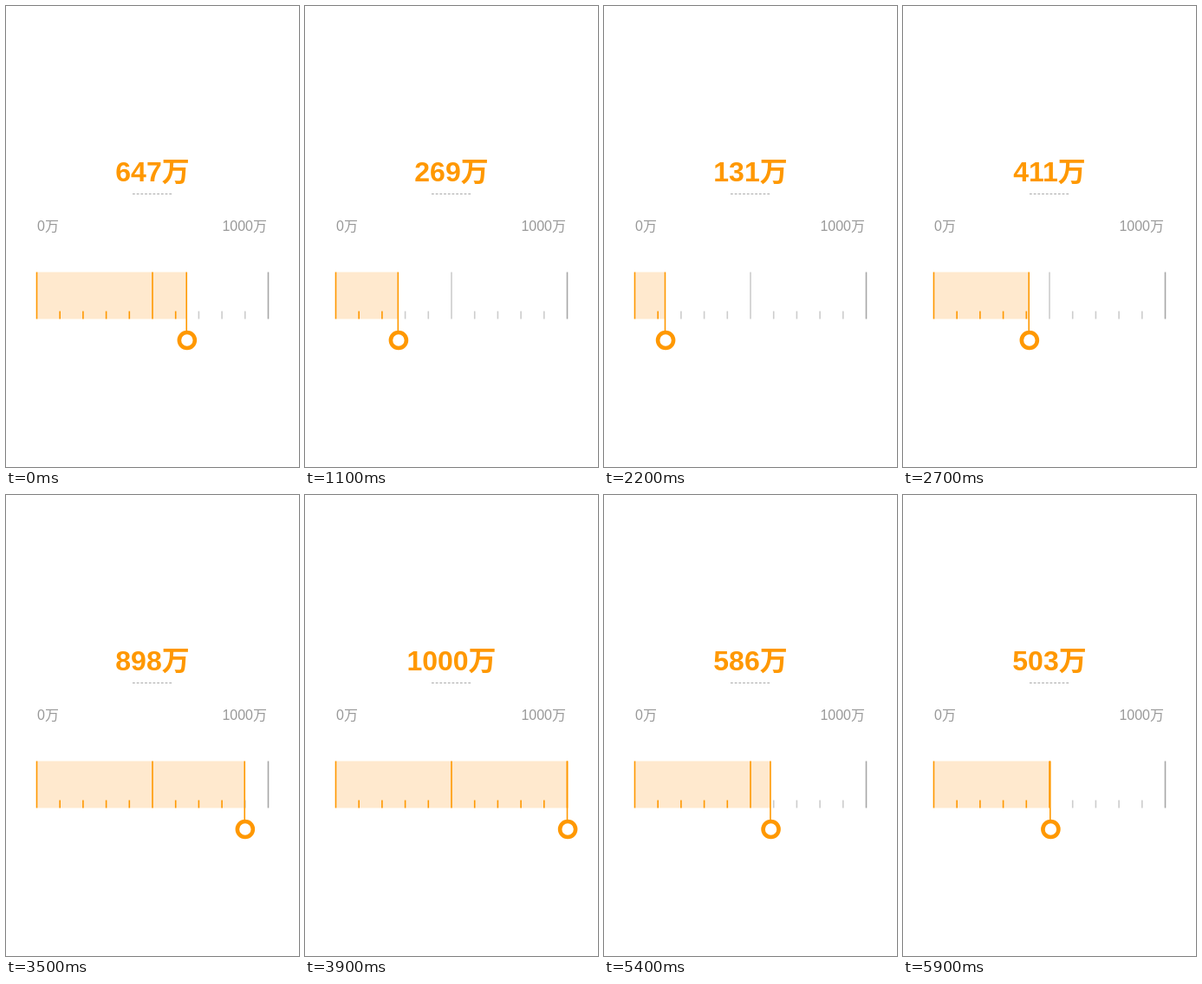
Write an HTML page with a canvas that moves like this. It is 338 px wide and 531 px high and loops after 6 s.

```html
<!DOCTYPE html>
<html lang="zh">
<head>
<meta charset="utf-8">
<style>
  html, body { margin: 0; width: 100%; height: 100%; overflow: hidden; background: #fff; }
  canvas { display: block; }
</style>
</head>
<body>
<canvas id="stage" width="338" height="531"></canvas>
<script>
const ctx = document.getElementById('stage').getContext('2d');
const ORANGE = '#ff9800', FONT = '"Liberation Sans", "Noto Sans CJK SC", "Noto Sans CJK", sans-serif';
const LOOP = 6000, STEP = 100;
const LEFT = 35.5, TOP = 306.5, BOTTOM = 360.5, SCALE = 0.267;

// [time in ms, slider value]
const keys = [
  [0, 647], [500, 647], [600, 650], [800, 534], [1100, 269], [1200, 224], [1700, 90],
  [2100, 90], [2200, 131], [2700, 411], [3500, 898], [3900, 1000],
  [4800, 1000], [4900, 904], [5500, 555], [5900, 503], [LOOP, 503]
];

const slope = i => (keys[i + 1][1] - keys[i][1]) / (keys[i + 1][0] - keys[i][0]);

// Tangent that keeps the curve from overshooting
function tangent(i) {
  if (i === 0 || i === keys.length - 1) return 0;
  const a = slope(i - 1), b = slope(i);
  return a * b > 0 ? 2 * a * b / (a + b) : 0;
}

function valueAt(t) {
  const i = keys.findIndex((k, n) => n < keys.length - 1 && t < keys[n + 1][0]);
  const [t0, v0] = keys[i], [t1, v1] = keys[i + 1];
  const h = t1 - t0, u = (t - t0) / h, w = 1 - u;
  return Math.round(
    w * w * (1 + 2 * u) * v0 + u * u * (3 - 2 * u) * v1 +
    h * u * w * (w * tangent(i) - u * tangent(i + 1)));
}

const xOf = value => LEFT + value * SCALE;

function line(x1, y1, x2, y2, color, width = 1.6) {
  ctx.strokeStyle = color;
  ctx.lineWidth = width;
  ctx.beginPath();
  ctx.moveTo(x1, y1);
  ctx.lineTo(x2, y2);
  ctx.stroke();
}

function label(text, x, y, align, font, color) {
  ctx.font = `${font} ${FONT}`;
  ctx.textAlign = align;
  ctx.fillStyle = color;
  ctx.fillText(text, x, y);
}

function draw(value) {
  const x = xOf(value);
  ctx.fillStyle = '#fff';
  ctx.fillRect(0, 0, 338, 531);

  label(`${value}万`, 169, 201.5, 'center', 'bold 32px', ORANGE);
  label('0万', 36, 259, 'left', '16px', '#999');
  label('1000万', 301, 259, 'right', '16px', '#999');

  ctx.setLineDash([2.8, 1.9]);
  line(146, 216.5, 192, 216.5, '#aaa', 1);
  ctx.setLineDash([]);

  ctx.fillStyle = '#ffe9ce';
  ctx.fillRect(LEFT, TOP, x - LEFT, BOTTOM - TOP);

  for (let tick = 0; tick <= 1000; tick += 100) {
    const color = tick <= value ? ORANGE : tick === 1000 ? '#a6a6a6' : '#ccc';
    line(xOf(tick), tick % 500 ? 351.5 : TOP, xOf(tick), BOTTOM, color);
  }

  line(x, TOP, x, 376, ORANGE);
  ctx.beginPath();
  ctx.arc(x + 0.6, 385, 9, 0, 2 * Math.PI);
  ctx.fillStyle = '#fff';
  ctx.fill();
  ctx.lineWidth = 4.6;
  ctx.stroke();
}

function frame() {
  const t = performance.now() % LOOP;
  draw(valueAt(Math.floor(t / STEP) * STEP));
  requestAnimationFrame(frame);
}
frame();
</script>
</body>
</html>
```
